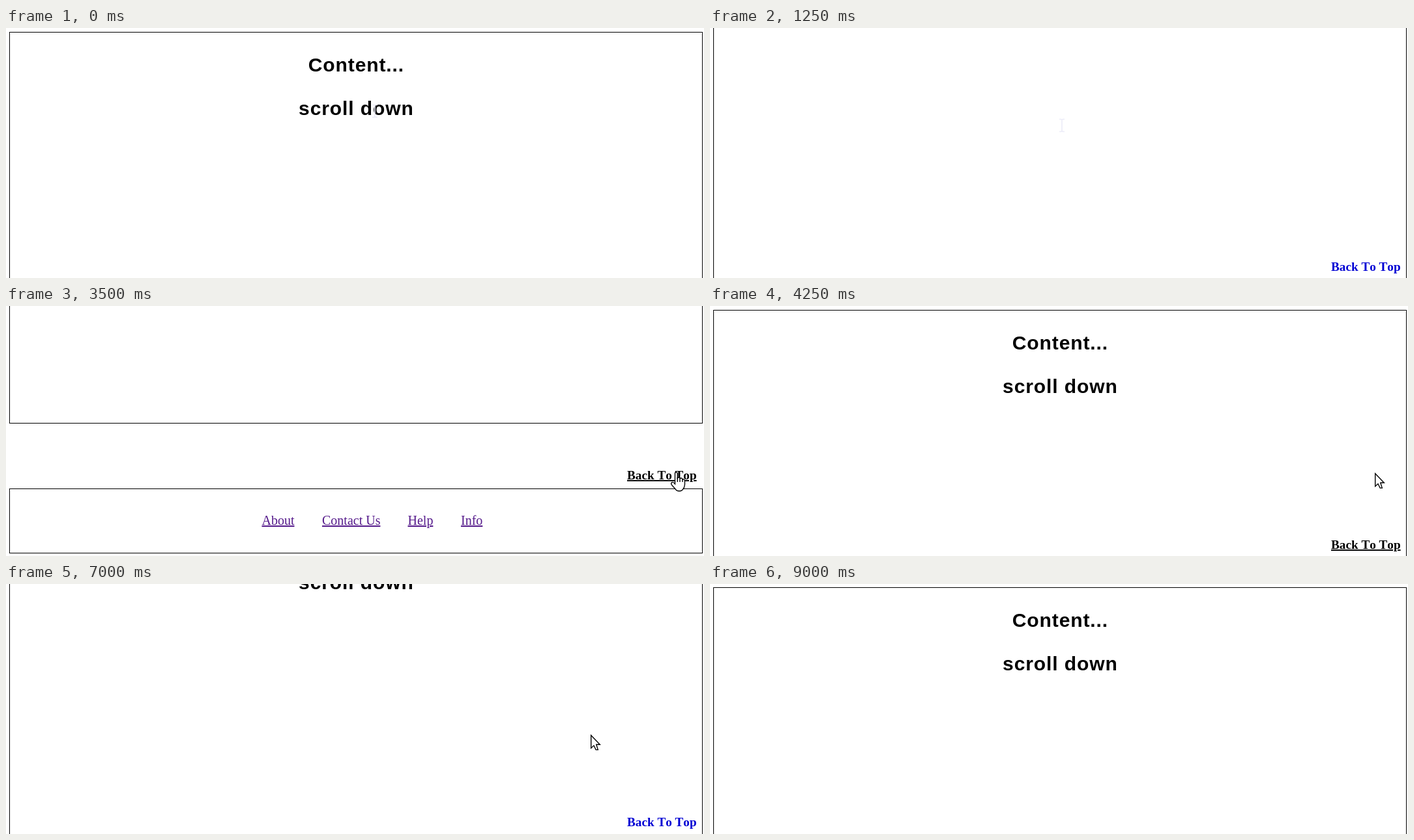
Write an HTML page that moves like this. It is 1071 px wide and 385 px high and loops after 9500 ms.

```html
<!DOCTYPE html>
<html lang="en">
<head>
<meta charset="utf-8">
<title>Back to top</title>
<style>
  html, body { margin: 0; width: 100%; height: 100%; overflow: hidden; background: #fff; }
  svg { display: block; width: 1071px; height: 385px; }
  .box { fill: none; stroke: #000; stroke-width: 1; shape-rendering: crispEdges; }
  .heading { font: bold 30px "Liberation Sans", Arial, sans-serif; letter-spacing: .03em; text-anchor: middle; }
  .nav { font: 20px "Liberation Serif", Times, serif; fill: #551a8b; text-decoration: underline; }
  #toTop { font: bold 19.2px "Liberation Serif", Times, serif; font-kerning: none; }
  #arrow, #hand { fill: #fff; stroke: #000; stroke-width: 1.4; }
  #beam { fill: none; stroke: #ececf8; stroke-width: 1.6; }
</style>
</head>
<body>
<svg viewBox="0 0 1071 385">
  <g id="page">
    <rect id="content" class="box" x="5.5" y="6.5" width="1063"/>
    <text class="heading" x="537.4" y="67">Content...</text>
    <text class="heading" x="537.4" y="134">scroll down</text>
    <g id="footer">
      <rect class="box" x="5.5" y="281.5" width="1063" height="99"/>
      <text class="nav" x="392.5" y="337">About</text>
      <text class="nav" x="485" y="337">Contact Us</text>
      <text class="nav" x="616.5" y="337">Help</text>
      <text class="nav" x="698" y="337">Info</text>
    </g>
  </g>
  <text id="toTop" x="953">Back To Top</text>
  <g id="cursor">
    <path id="beam" d="M-4-9.5H-2Q0-9.5 0-8V8Q0 9.5-2 9.5H-4M4-9.5H2Q0-9.5 0-8M0 8Q0 9.5 2 9.5H4"/>
    <path id="arrow" d="M.7.9V20.7L5 16.8 8.2 23.4H11.3L8.8 15.3H14.3Z"/>
    <g id="hand" transform="translate(0 -2)">
      <path d="M6.5 18V3Q6.5 1 8.3 1T10.3 3V10Q13 8 14 10.5Q17 9 18 12Q21 11 21.5 14V20Q21 25 18.5 27.5Q17 30 13 30T7.5 27.5L1 20Q0 17 2.5 16.5Q4 16 6.5 19Z"/>
      <path d="M10.3 9V16M14 11V16M18 12V16"/>
    </g>
  </g>
</svg>
<script>
const LOOP = 9500, STEP = 250, MAX_SCROLL = 900;
const el = id => document.getElementById(id);

// Progress from 0 to 1 between two times.
const ramp = (t, from, to) => Math.min(1, Math.max(0, (t - from) / (to - from)));

function scrollAt(t) {
  const firstVisit = 500 * ramp(t, 0, 1250) + 400 * ramp(t, 2250, 3000);
  const jumpBack = MAX_SCROLL * ramp(t, 3500, 4250);
  const overshoot = 200 * ramp(t, 5500, 5750) - 83 * ramp(t, 5750, 6250);
  const nudge = 8 * ramp(t, 6750, 7000);
  const finish = 125 * ramp(t, 7250, 8250);
  return Math.round(firstVisit - jumpBack + overshoot + nudge - finish);
}

const linkOpacity = t =>
  ramp(t, 250, 1000) - ramp(t, 4250, 4750) + ramp(t, 5700, 6250) - ramp(t, 7500, 8250);

function cursorPosition(t) {
  const drift = ramp(t, 0, 1250), toLink = ramp(t, 2500, 3500);
  const away = ramp(t, 4250, 4750), leave = ramp(t, 8500, 8750);
  const x = 566 - 26 * drift + 480 * toLink - 123 * away - 172 * leave;
  const y = 128 + 22 * drift + 107 * toLink - 25 * away + 107 * leave;
  return `${Math.round(x)} ${Math.round(y)}`;
}

function cursorShape(t) {
  if (t >= 9000) return "none";
  if (t < 2750) return "beam";
  return t >= 3500 && t < 4250 ? "hand" : "arrow";
}

el("content").setAttribute("height", MAX_SCROLL + 174);
el("footer").setAttribute("transform", `translate(0 ${MAX_SCROLL})`);

function render(time) {
  const t = Math.floor(time % LOOP / STEP) * STEP;
  const scroll = scrollAt(t);
  const shift = t >= 5750 ? -1 : 0;
  const hover = t >= 3500 && t < 4750;

  el("page").setAttribute("transform", `translate(0 ${shift - scroll})`);

  // The link stays at the bottom edge until the footer pushes it up.
  const link = el("toTop");
  link.setAttribute("y", Math.min(374, 267 + MAX_SCROLL - scroll) + shift);
  link.setAttribute("opacity", linkOpacity(t));
  link.setAttribute("fill", hover ? "#000" : "#0000d4");
  link.setAttribute("text-decoration", hover ? "underline" : "none");

  const shape = cursorShape(t);
  for (const id of ["beam", "arrow", "hand"])
    el(id).setAttribute("display", id === shape ? "inline" : "none");
  el("cursor").setAttribute("transform", `translate(${cursorPosition(t)})`);
}

const start = performance.now();
function loop() {
  render(performance.now() - start);
  requestAnimationFrame(loop);
}
loop();
</script>
</body>
</html>
```
